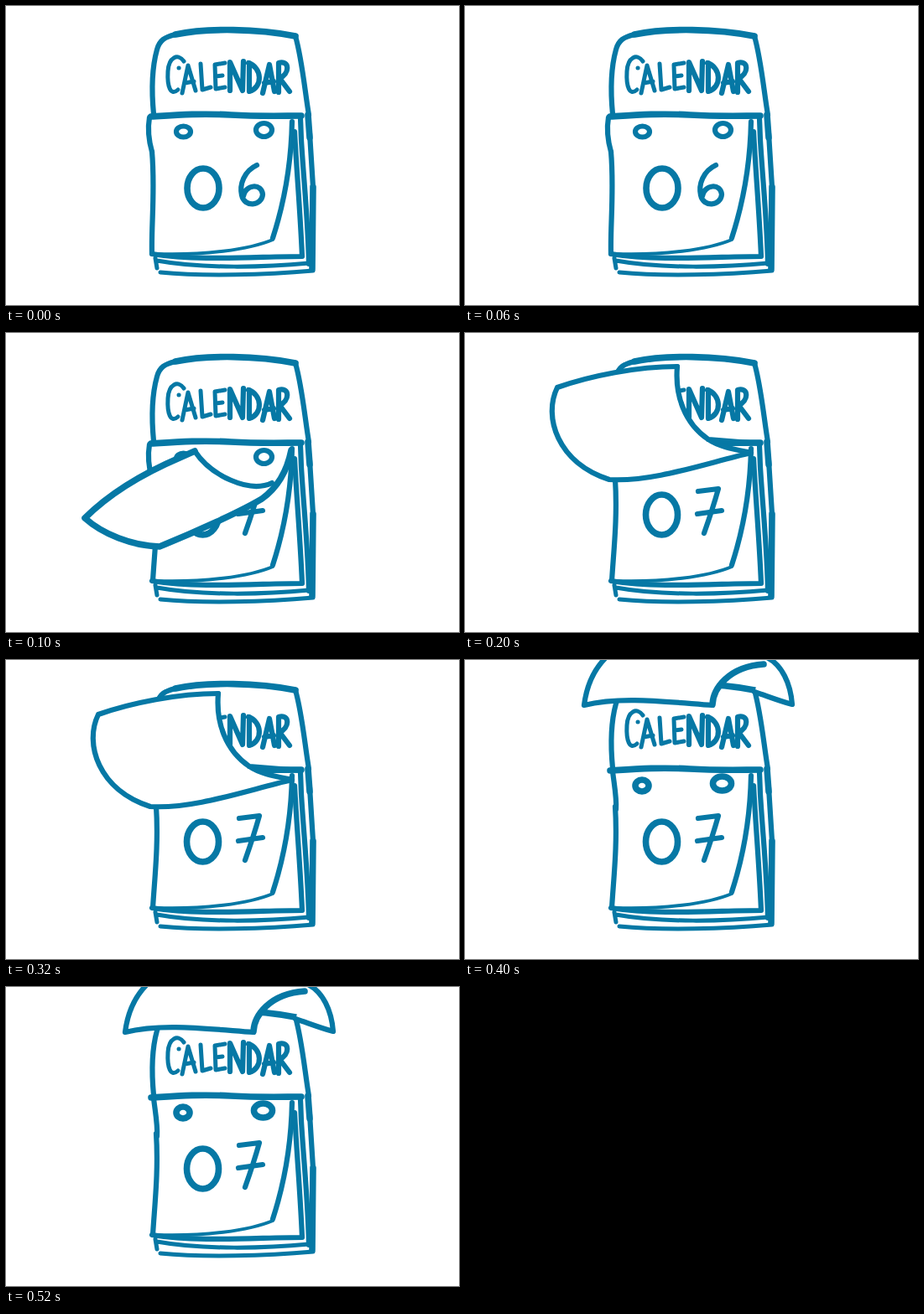
Write an HTML page that moves like this. It is 540x357 px and loops after 0.6 s.

```html
<!DOCTYPE html>
<html lang="en">
<head>
<meta charset="utf-8">
<title>Calendar</title>
<style>
  html, body { margin: 0; width: 100%; height: 100%; overflow: hidden; background: #fff; }
  svg { display: block; width: 100%; height: 100%; }
  path, ellipse { fill: none; stroke: #0678a5; stroke-linecap: round; stroke-linejoin: round; }
  .flap .paper { fill: #fff; stroke: none; }
  .w3 { stroke-width: 4; }
  .w4 { stroke-width: 5; }
  .w5 { stroke-width: 6.2; }
  .w6 { stroke-width: 7.6; }
</style>
</head>
<body>
<svg viewBox="0 0 540 357">
  <!-- cover -->
  <path class="w5" d="M176 129C173 98 175 70 180 52C183 41 189 37 202 34"/>
  <path class="w6" d="M202 34C240 26 300 27 345 36"/>
  <path class="w5" d="M345 36C353 64 356 100 361 130"/>
  <path class="w6" d="M173 132C205 130 232 128 268 130S330 131 352 131"/>

  <!-- lettering -->
  <g class="w4">
    <path d="M212 66C205 56 194 61 193 78C192 96 196 108 205 100M206 74h.1"/>
    <path d="M210 104L217 71L226 101M213 92L224 90"/>
    <path d="M232 69L234 100L244 97"/>
    <path d="M261 68L249 70L250 99L261 97M250 84L258 83"/>
  </g>
  <g class="w5">
    <path d="M267 101L267 67L282 101L283 66"/>
    <path d="M290 68L290 102C307 97 305 73 289 68"/>
    <path d="M306 104L314 70L320 102M308 92L319 90"/>
    <path d="M325 103L325 68C339 64 338 82 326 86L338 102"/>
  </g>

  <!-- stacked pages -->
  <path class="w5" d="M341 138C340 190 330 240 318 277"/>
  <path class="w3" d="M318 279C290 291 235 298 178 296"/>
  <path class="w5" d="M344 150C347 205 351 250 353 299C300 299 230 305 174 296"/>
  <path class="w5" d="M351 134L352 160C355 210 360 255 361 308"/>
  <path class="w6" d="M360 130L362 157M366 216L365 314"/>
  <path class="w5" d="M362 152L366 216"/>
  <path class="w4" d="M178 301L180 313M361 307C310 312 235 314 180 304M366 316C310 321 235 323 184 318"/>

  <!-- left edge of the front page -->
  <path class="w5" data-on="0 1" d="M171 133C169 145 170 160 174 174"/>
  <path class="w5" data-on="3" d="M176 133C178 150 181 165 180 178"/>
  <path class="w5" data-on="0" d="M174 174C178 220 173 262 174 296"/>
  <path class="w5" data-on="1 2 3" d="M179 175C182 220 177 262 175 296"/>

  <!-- holes -->
  <g class="w5" data-on="0 1">
    <ellipse cx="211.500" cy="150" rx="8.500" ry="6.500"/>
    <ellipse cx="307.500" cy="148" rx="9.500" ry="8"/>
  </g>
  <g class="w6" data-on="3">
    <ellipse cx="211" cy="150" rx="8" ry="7"/>
    <ellipse cx="306.500" cy="147.500" rx="11" ry="8.500"/>
  </g>

  <!-- day numbers -->
  <g class="w6" data-on="0">
    <ellipse cx="235" cy="217.500" rx="19" ry="23.500"/>
    <path class="w5" d="M299 190C284 197 278 213 281 226C284 241 305 239 306 225C305 211 285 213 283 227"/>
  </g>
  <g data-on="1 2 3">
    <ellipse class="w6" cx="234.500" cy="217" rx="19" ry="24"/>
    <path class="w5" d="M278 189L302 186C297 204 291 222 285 239M277 216L306 212"/>
  </g>

  <!-- lifting page -->
  <g class="flap" data-on="1">
    <path class="paper" d="M93 221C130 187 180 163 225 141C244 170 290 192 317 179L305 198C280 213 225 238 183 256C150 254 115 240 93 221Z"/>
    <path class="w5" d="M225 141C244 170 290 192 317 179"/>
    <path class="w6" d="M225 141L207 149C165 167 125 190 94 221C115 240 150 254 183 255C225 238 280 213 305 198C326 183 336 160 340 140"/>
  </g>
  <g class="flap" data-on="2">
    <path class="paper" d="M110 65C150 51 205 40 253 40C250 75 262 108 290 127C303 136 322 139 341 143C285 156 225 178 172 175C110 155 93 100 110 65Z"/>
    <path class="w5" d="M253 40C205 40 150 51 110 65C93 100 110 155 172 175C225 178 285 156 341 143"/>
    <path class="w5" d="M253 40C250 75 262 108 290 127C303 136 322 139 341 143M290 127L352 132"/>
  </g>
  <g class="flap" data-on="3">
    <path class="paper" d="M142 54C185 43 240 50 295 54C296 34 314 8 357 5V-9H167C152 10 145 30 142 54Z"/>
    <path class="paper" d="M357 5L362-4C378 8 388 28 390 53C375 49 360 43 345 38Z"/>
    <path class="w5" d="M168-3C153 12 145 30 142 54C185 43 240 50 295 54"/>
    <path class="w6" d="M295 53C296 34 314 8 356 5"/>
    <path class="w5" d="M360-3C378 6 388 28 390 53C375 49 360 43 345 38"/>
  </g>
</svg>
<script>
  const starts = [0, 100, 200, 400], loop = 600;
  const parts = [...document.querySelectorAll('[data-on]')];
  const began = performance.now();

  function draw() {
    const t = (performance.now() - began) % loop;
    const pose = starts.filter(s => s <= t).length - 1;
    for (const p of parts) {
      p.style.display = p.dataset.on.includes(pose) ? '' : 'none';
    }
    requestAnimationFrame(draw);
  }
  draw();
</script>
</body>
</html>
```
